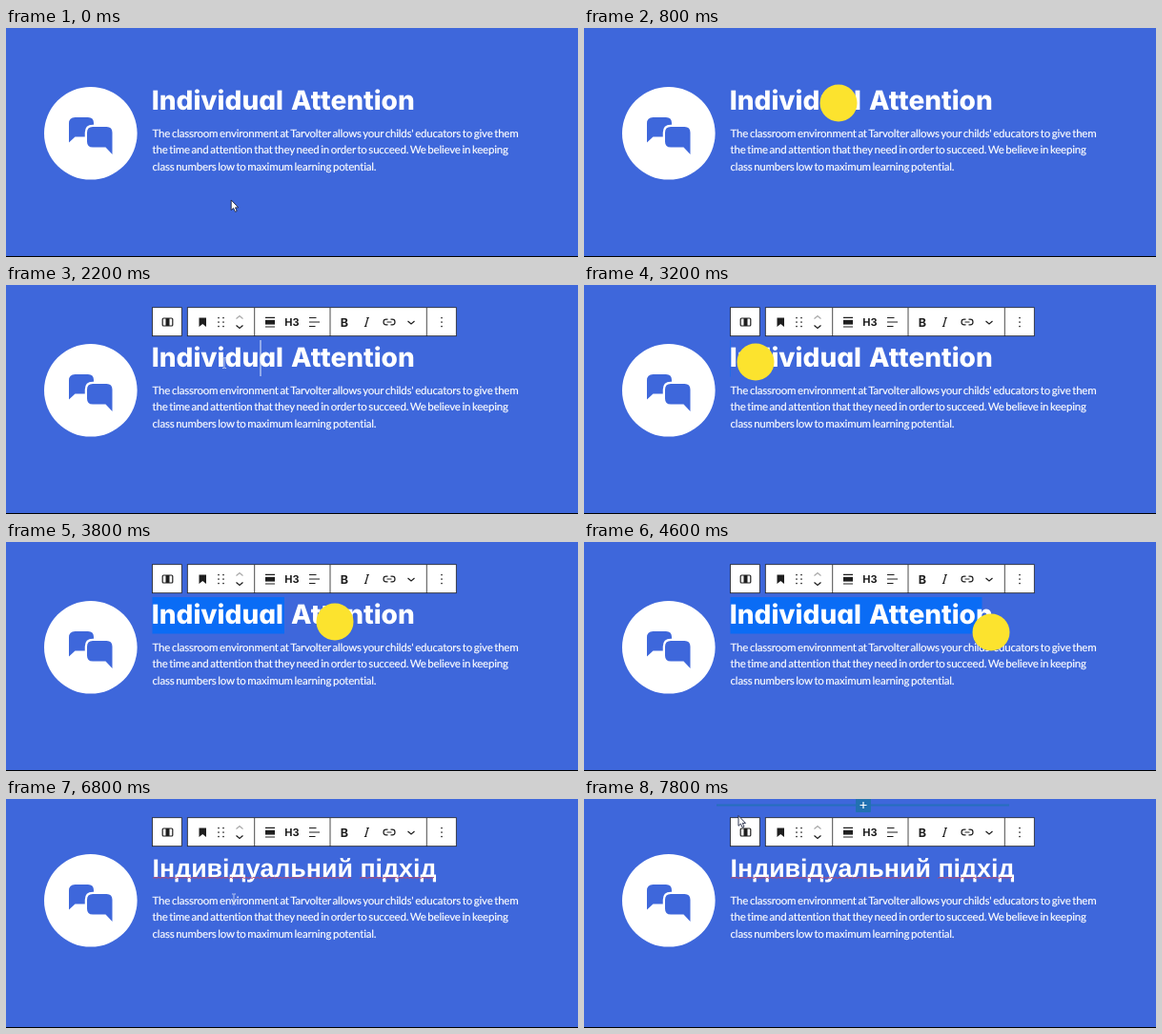
Write an HTML page that moves like this. It is 600x241 px and loops after 8 s.

```html
<!DOCTYPE html>
<html lang="en">
<head>
<meta charset="utf-8">
<title>Editing a heading</title>
<style>
  html, body { margin: 0; width: 100%; height: 100%; overflow: hidden; background: #3e67db; }
  svg { display: block; width: 100%; height: 100%; text-rendering: geometricPrecision; }
  .title { font: 800 28px Inter, sans-serif; font-feature-settings: "cv11"; fill: #fff; }
  .translated { font: 700 26.8px "Liberation Sans", Arial, sans-serif; fill: #fff; }
  .body { font: 400 11.5px Lato, sans-serif; letter-spacing: -.21px; word-spacing: -1px;
          fill: #fff; stroke: #fff; stroke-width: .15; }
  .bar { font: 700 11px Inter, sans-serif; fill: #1e1e1e; text-anchor: middle; }
  .line { fill: none; stroke: #1e1e1e; stroke-width: 1.2; }
  .ink { fill: #1e1e1e; }
</style>
</head>
<body>
<svg viewBox="0 0 600 241">
  <rect width="600" height="241" fill="#3e67db"/>
  <g id="page">
    <circle cx="88.8" cy="110.800" r="48.8" fill="#fff"/>
    <g fill="#3e67db">
      <path d="M66 120.500V100.500Q66 94 72.500 94H86Q92 94 92 100V114.500H72.500Z"/>
      <path d="M111.500 133L104.500 125.500H91Q85 125.500 85 119.500V110Q85 104 91 104H105.500Q111.500 104 111.500 110Z"
            stroke="#fff" stroke-width="4.500" paint-order="stroke"/>
    </g>

    <rect id="selection" x="153.500" y="58" height="38.500" fill="#0a6cf5"/>
    <g id="english" class="title">
      <text x="152.800" y="86.200">Individual</text>
      <text x="299" y="86.200">Attention</text>
    </g>
    <g id="ukrainian">
      <text class="translated" x="153.500" y="86.300">Індивідуальний підхід</text>
      <path id="squiggle" fill="none" stroke="#b8486f" stroke-width="1"/>
    </g>
    <rect id="caret" x="266.500" y="58" width="1" height="38" fill="#e8edfb"/>

    <g class="body">
      <text x="153.600" y="115">The classroom environment at Tarvolter allows your childs' educators to give them</text>
      <text x="153.600" y="132.300">the time and attention that they need in order to succeed. We believe in keeping</text>
      <text x="153.600" y="149.500">class numbers low to maximum learning potential.</text>
    </g>

    <g id="toolbar">
      <g fill="#fff" stroke="#1e1e1e" stroke-width=".8">
        <rect x="153.500" y="23.700" width="30.800" height="30"/>
        <rect x="190.300" y="23.700" width="282" height="30"/>
        <path d="M260.700 24v30M340 24v30M441.300 24v30"/>
      </g>
      <rect class="line" x="164.200" y="35" width="10.600" height="8" rx="1"/>
      <path class="ink" d="M167.500 35h4v8h-4zM202.500 34.500h7.500v9.500l-3.750-3-3.750 3z"/>
      <g id="dots" class="ink"></g>
      <path class="line" d="M241.500 35.500l3.500-3 3.500 3" style="stroke:#a8a8a8"/>
      <path class="line" d="M241.500 42.500l3.500 3 3.500-3M421.500 38l3.500 3 3.500-3"/>
      <path class="line" d="M272 34.300h10M272 44h10M318 34.500h7.500M318 39h11M318 43.500h6.500"/>
      <path class="ink" d="M272 36.800h10v4.800h-10z"/>
      <text class="bar" x="300" y="43">H3</text>
      <text class="bar" x="354.800" y="43.500" style="font-size:12.5px">B</text>
      <path class="line" d="M378.300 34.500h2.600M375.800 43.500h2.600M379.700 34.500l-2.600 9"/>
      <path class="line" d="M400.500 36.200h-1.700a2.800 2.800 0 0 0 0 5.600h1.700M403.500 36.200h1.700a2.800 2.800 0 0 1 0 5.600h-1.700M399.500 39h5"/>
    </g>
  </g>

  <g id="inserter">
    <path d="M139 6.500H446" stroke="#266fbd" stroke-width="2"/>
    <rect x="285" y="-2" width="16" height="16" rx="1" fill="#2271b1"/>
    <path d="M289.500 6.500h7M293 3v7" stroke="#fff" stroke-width="1.200"/>
  </g>
  <rect y="240" width="600" height="1" fill="#000"/>

  <circle id="press" r="19.500" fill="#fce32e"/>
  <path id="arrow" d="M0 0V10.800L2.400 8.600L4.200 12.400L6 11.600L4.300 7.900H7.500Z"
        fill="#fff" stroke="#1b2340" stroke-width=".9"/>
  <path id="beam" d="M-2-5.500h1.300L0-5l.7-.5H2M0-5V5M-2 5.500h1.300L0 5l.7.500H2"
        fill="none" stroke="#c9d4f2" stroke-width=".9"/>
</svg>
<script>
const LOOP = 8000, STEP = 200;
const $ = id => document.getElementById(id);

// pointer path: time, x, y
const path = [
  [0, 236.2, 181], [200, 239, 170], [600, 264, 86], [800, 267, 79], [1000, 262, 78],
  [1400, 153, 71], [1600, 158, 74], [2200, 229, 82], [2400, 190, 83], [2800, 154, 80],
  [3000, 154, 80], [3200, 180, 81], [3600, 292, 83], [3800, 345, 84], [4200, 408, 89],
  [4600, 427, 95], [5000, 429, 90], [5400, 429, 87], [6000, 429, 87], [6400, 340, 100],
  [6800, 239, 105.5], [7200, 196, 62], [7600, 164, 12], [7800, 162, 17.5], [8000, 162, 17.5]
];

function pointer(t) {
  const i = Math.max(1, path.findIndex(p => p[0] >= t));
  const [t0, x0, y0] = path[i - 1], [t1, x1, y1] = path[i];
  const k = (t - t0) / (t1 - t0);
  return { x: x0 + (x1 - x0) * k, y: y0 + (y1 - y0) * k };
}

const within = (t, a, b) => t >= a && t < b;
const show = (id, on) => $(id).style.display = on ? "" : "none";
const move = (id, x, y) => $(id).setAttribute("transform", `translate(${x} ${y})`);

function wave(from, to) {
  let d = `M${from} 87.500`;
  for (let x = from, up = 1; x < to - 2; x += 2, up = -up) d += `l2 ${-1.2 * up}`;
  return d;
}

function build() {
  $("squiggle").setAttribute("d", wave(154, 364) + wave(371, 451));
  $("dots").innerHTML = [223, 228, 457].map(x => [34.5, 39, 43.5].map(y =>
    `<circle cx="${x}" cy="${y}" r=".85"/>`).join("")).join("");
}

function draw(t) {
  const p = pointer(t), translated = t >= 6200;
  const pressed = within(t, 800, 1000) || within(t, 3000, 5000);
  const arrow = t < 600 || within(t, 1400, 1600) || t >= 7200;

  move("page", 0, translated ? -4 : 0);
  show("toolbar", t >= 1000);
  show("english", !translated);
  show("ukrainian", translated);
  show("inserter", t >= 7800);
  show("caret", within(t, 1000, 3000) && (t - 800) % 1000 < 500);

  // the highlight trails the pointer by one step
  const end = t >= 4800 ? 429 : Math.min(429, pointer(Math.max(0, t - STEP)).x);
  show("selection", within(t, 3200, 6200));
  $("selection").setAttribute("width", Math.max(0, end - 153.5));

  show("press", pressed);
  show("arrow", arrow && !pressed);
  show("beam", !arrow && !pressed);
  for (const id of ["press", "arrow", "beam"]) move(id, p.x, p.y);
}

function tick() {
  const t = performance.now() % LOOP;
  draw(Math.floor(t / STEP) * STEP);
  requestAnimationFrame(tick);
}

build();
draw(0);
requestAnimationFrame(tick);
</script>
</body>
</html>
```
